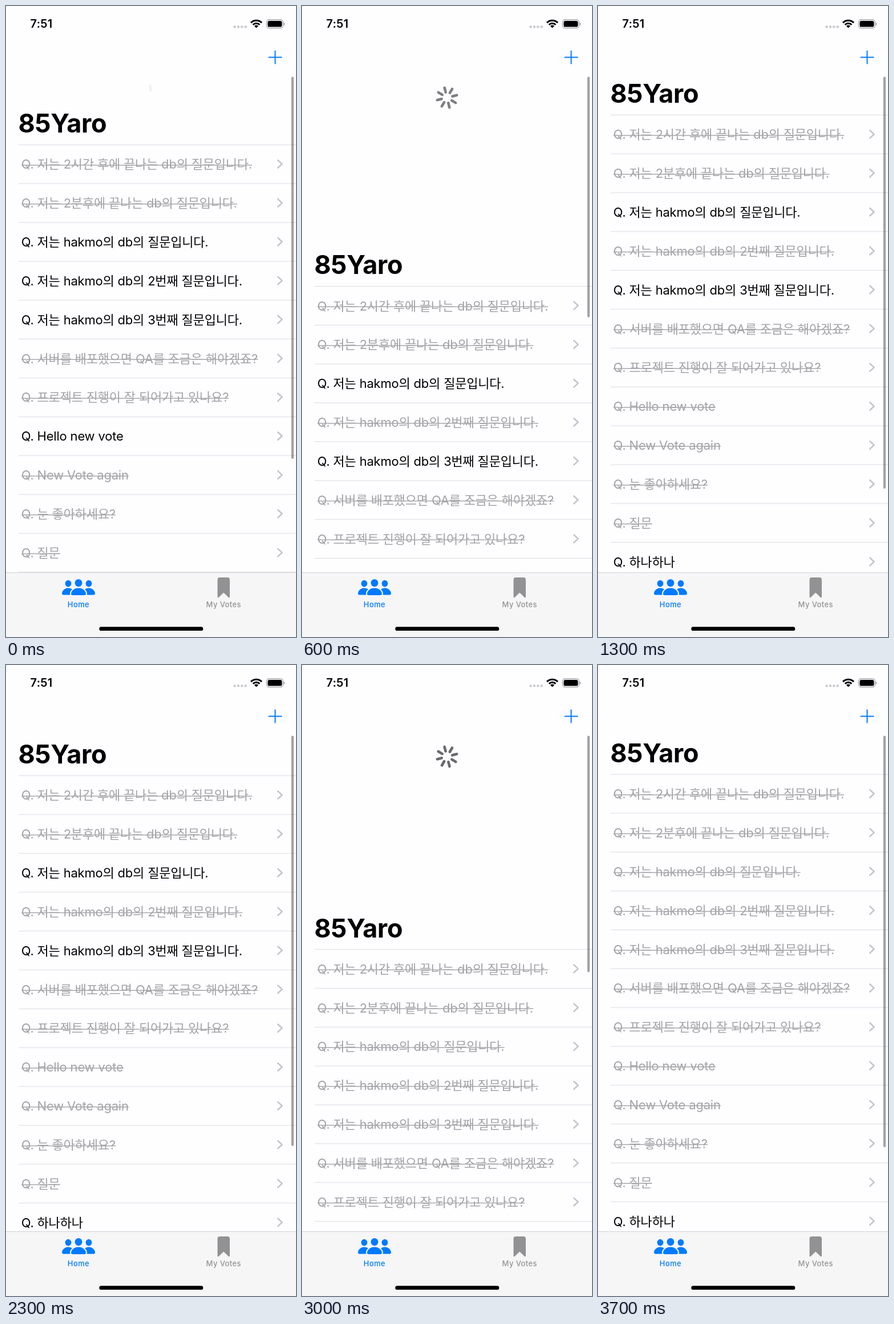
An HTML page with a canvas that plays this animation: 508x1102 px, repeating every 3800 ms.

```html
<!DOCTYPE html>
<html lang="ko">
<head>
<meta charset="utf-8">
<title>Pull to refresh</title>
<style>
  html, body { margin: 0; width: 100%; height: 100%; overflow: hidden; background: #fefdff; }
  canvas { display: block; width: 508px; height: 1102px; }
</style>
</head>
<body>
<canvas id="stage"></canvas>
<script>
const W = 508, H = 1102, LOOP = 3800, STEP = 100;
const REST = 190, ROW = 67.86, TAB_TOP = 989;
const BG = '#fefdff', BAR = '#f6f6f7', BLUE = '#007aff', GREY = '#a3a3a5';
const FONT = 'Inter, "Noto Sans CJK KR", "Noto Sans CJK", sans-serif';

// closed: time in ms from which a question is struck out
const rows = [
  { text: 'Q. 저는 2시간 후에 끝나는 db의 질문입니다.', closed: 0 },
  { text: 'Q. 저는 2분후에 끝나는 db의 질문입니다.', closed: 0 },
  { text: 'Q. 저는 hakmo의 db의 질문입니다.', closed: 2700 },
  { text: 'Q. 저는 hakmo의 db의 2번째 질문입니다.', closed: 400 },
  { text: 'Q. 저는 hakmo의 db의 3번째 질문입니다.', closed: 2700 },
  { text: 'Q. 서버를 배포했으면 QA를 조금은 해야겠죠?', closed: 0 },
  { text: 'Q. 프로젝트 진행이 잘 되어가고 있나요?', closed: 0 },
  { text: 'Q. Hello new vote', closed: 400 },
  { text: 'Q. New Vote again', closed: 0 },
  { text: 'Q. 눈 좋아하세요?', closed: 0 },
  { text: 'Q. 질문', closed: 0 },
  { text: 'Q. 하나하나', closed: Infinity }
];

// each pull: drag from -> peak, then spring back to rest
const pulls = [
  { start: 0, release: 600, end: 1300, from: 242, peak: 489.2, spin: 330 },
  { start: 2300, release: 3050, end: 3800, from: 193, peak: 499, spin: 2735 }
];

const canvas = document.getElementById('stage');
const ctx = canvas.getContext('2d');
const dpr = window.devicePixelRatio || 1;
canvas.width = W * dpr;
canvas.height = H * dpr;

const clamp = (v, lo, hi) => Math.min(hi, Math.max(lo, v));

function listTop(t, pull) {
  if (!pull) return REST;
  if (t < pull.release) {
    const x = (t - pull.start) / (pull.release - pull.start);
    return pull.from + (pull.peak - pull.from) * (1 - (1 - x) ** 1.76);
  }
  const k = (t - pull.release) * 0.0126;
  return REST + (pull.peak - REST) * (1 + k) * Math.exp(-k);
}

function label(text, x, y, size, weight, color, spacing = 0, align = 'left') {
  ctx.font = `${weight} ${size}px ${FONT}`;
  ctx.letterSpacing = spacing + 'px';
  ctx.textAlign = align;
  ctx.fillStyle = color;
  ctx.fillText(text, x, y);
  return ctx.measureText(text).width;
}

function pill(x, y, w, h, r, color) {
  ctx.fillStyle = color;
  ctx.beginPath();
  ctx.roundRect(x, y, w, h, r);
  ctx.fill();
}

function line(points, width, color, cap = 'butt') {
  ctx.strokeStyle = color;
  ctx.lineWidth = width;
  ctx.lineCap = cap;
  ctx.lineJoin = cap === 'round' ? 'round' : 'miter';
  ctx.beginPath();
  points.forEach(([x, y]) => ctx.lineTo(x, y));
  ctx.stroke();
}

function oval(x, y, rx, ry, color) {
  ctx.fillStyle = color;
  ctx.beginPath();
  ctx.ellipse(x, y, rx, ry, 0, 0, Math.PI * 2);
  ctx.fill();
}

function drawStatus() {
  label('7:51', 42.5, 38.3, 20, 600, '#000', 0.3);
  for (let i = 0; i < 4; i++) pill(398.3 + i * 6.4, 34.2, 4.4, 4.4, 1.8, '#c9c9cb');

  const cx = 438.5, cy = 38.6, a = -Math.PI * 0.75, b = -Math.PI * 0.25;
  ctx.fillStyle = ctx.strokeStyle = '#000';
  ctx.lineCap = 'butt';
  ctx.beginPath();
  ctx.moveTo(cx, cy);
  ctx.arc(cx, cy, 5, a, b);
  ctx.fill();
  ctx.lineWidth = 3;
  for (const r of [8.3, 13.4]) {
    ctx.beginPath();
    ctx.arc(cx, cy, r, a, b);
    ctx.stroke();
  }

  ctx.strokeStyle = '#a3a3a5';
  ctx.lineWidth = 1.3;
  ctx.beginPath();
  ctx.roundRect(456.4, 24, 29, 14.6, 4.5);
  ctx.stroke();
  pill(458.4, 26, 25, 10.6, 2.9, '#000');
  pill(486.6, 29, 1.9, 4.8, [0, 1.9, 1.9, 0], '#a3a3a5');
}

function drawSpinner(t, top, pull) {
  if (!pull) return;
  const released = t >= pull.release;
  const shown = released ? 8 : (top - 241) / 12;
  const fade = released ? clamp((top - 205) / 143, 0, 0.85) : 1;
  const turn = Math.max(-4, (t - pull.spin) * 0.115) * Math.PI / 180;
  ctx.save();
  ctx.translate(254, Math.min(160, top - 85));
  ctx.rotate(turn);
  for (let i = 0; i < 8; i++) {
    ctx.globalAlpha = clamp(shown - i, 0, 1) * fade;
    line([[0, -9.6], [0, -17.7]], 4.6, '#69696c', 'round');
    ctx.rotate(Math.PI / 4);
  }
  ctx.restore();
}

function drawRow(row, y, t) {
  const closed = t >= row.closed;
  const width = label(row.text, 26.8, y + 42.3, 22, 400, closed ? GREY : '#000', -0.2);
  if (closed) {
    ctx.fillStyle = GREY;
    ctx.fillRect(27, y + 35.3, width, 1.4);
  }
  line([[476.3, y + 27.3], [483.6, y + 34], [476.3, y + 40.7]], 2.5, '#c4c4c6', 'round');
}

function drawList(t, top) {
  label('85Yaro', 21.5, top - 20.8, 45, 700, '#000', -0.3);
  rows.forEach((row, i) => drawRow(row, top + i * ROW, t));
  ctx.fillStyle = '#dcdcdf';
  for (let i = 0; i <= rows.length; i++) {
    ctx.fillRect(22, top + i * ROW - 0.2, W - 22, 1);
  }
  pill(499.8, 123.5, 4.2, 909.5 - top, 2.1, 'rgba(0,0,0,.36)');
}

function person(x, headY, rx, ry, bodyW, bodyTop, bottom) {
  oval(x, headY, rx, ry, BLUE);
  const half = bodyW / 2, h = bottom - bodyTop;
  ctx.beginPath();
  ctx.moveTo(x - half, bottom - 2.5);
  ctx.bezierCurveTo(x - half, bottom - h * 0.6, x - half * 0.55, bodyTop, x, bodyTop);
  ctx.bezierCurveTo(x + half * 0.55, bodyTop, x + half, bottom - h * 0.6, x + half, bottom - 2.5);
  ctx.quadraticCurveTo(x + half, bottom, x + half - 3, bottom);
  ctx.lineTo(x - half + 3, bottom);
  ctx.quadraticCurveTo(x - half, bottom, x - half, bottom - 2.5);
  ctx.closePath();
}

function drawTabs() {
  ctx.fillStyle = BAR;
  ctx.fillRect(0, TAB_TOP, W, H - TAB_TOP);
  ctx.fillStyle = '#d2d2d5';
  ctx.fillRect(0, TAB_TOP, W, 1);

  for (const x of [109, 145]) {
    person(x, 1008.6, 5.4, 5.8, 22, 1016.6, 1028.5);
    ctx.fillStyle = BLUE;
    ctx.fill();
  }
  person(127, 1007.6, 6.4, 6.7, 26, 1016.4, 1029);
  ctx.strokeStyle = BAR;
  ctx.lineWidth = 4;
  ctx.stroke();
  ctx.fillStyle = BLUE;
  ctx.fill();

  ctx.fillStyle = '#929295';
  ctx.beginPath();
  ctx.moveTo(370.5, 1032);
  ctx.lineTo(370.5, 1002);
  ctx.quadraticCurveTo(370.5, 998, 374.5, 998);
  ctx.lineTo(388, 998);
  ctx.quadraticCurveTo(392, 998, 392, 1002);
  ctx.lineTo(392, 1032);
  ctx.quadraticCurveTo(391.5, 1034, 389.5, 1032.5);
  ctx.lineTo(381.2, 1024.5);
  ctx.lineTo(373, 1032.5);
  ctx.quadraticCurveTo(371, 1034, 370.5, 1032);
  ctx.fill();

  label('Home', 127, 1050, 13, 500, BLUE, 0.4, 'center');
  label('My Votes', 381.3, 1050, 13, 500, '#929295', 0.4, 'center');
  pill(163.3, 1084.3, 182, 6.8, 3.4, '#000');
}

function draw(t) {
  const pull = pulls.find(p => t >= p.start && t < p.end);
  const top = listTop(t, pull);
  ctx.setTransform(dpr, 0, 0, dpr, 0, 0);
  ctx.fillStyle = BG;
  ctx.fillRect(0, 0, W, H);
  drawSpinner(t, top, pull);
  drawList(t, top);
  drawTabs();
  drawStatus();
  line([[459.7, 89.6], [483.3, 89.6]], 2, BLUE);
  line([[471.5, 77.8], [471.5, 101.4]], 2, BLUE);
}

const begin = performance.now();
function tick() {
  const t = (performance.now() - begin) % LOOP;
  draw(Math.floor(t / STEP) * STEP);
  requestAnimationFrame(tick);
}
tick();
</script>
</body>
</html>
```
